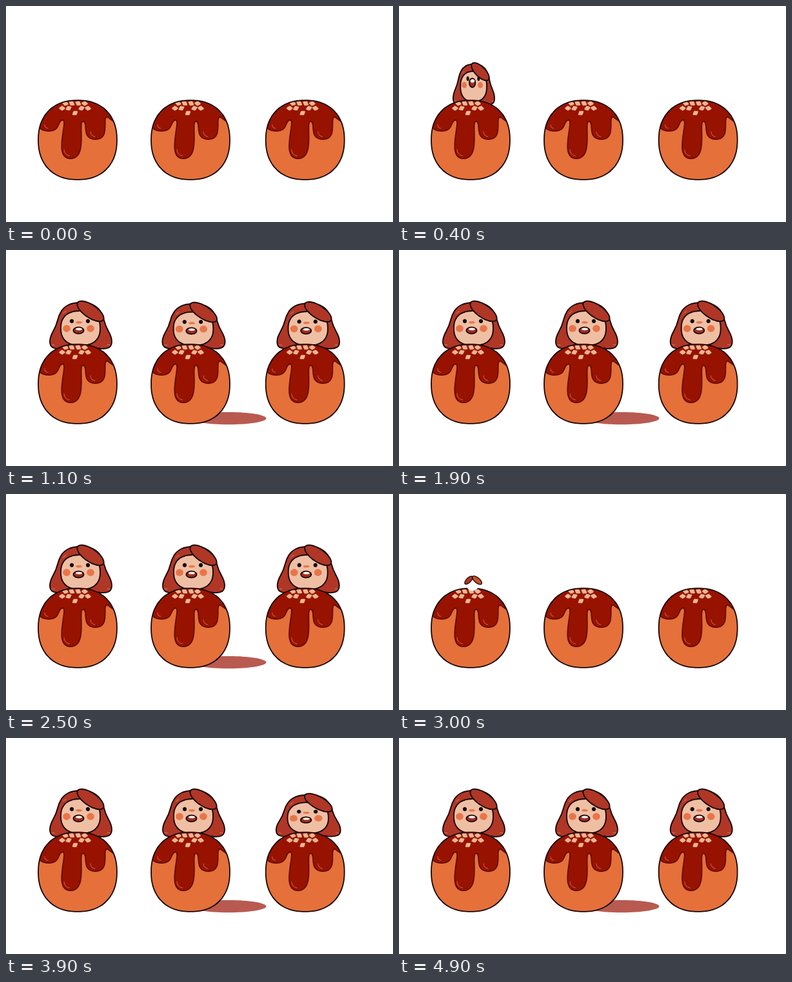
Animation of 600x337 px, one loop 5 s. Source, as an HTML page with a canvas:

```html
<!DOCTYPE html>
<html lang="en">
<head>
<meta charset="utf-8">
<title>Dumplings</title>
<style>
html, body { margin: 0; width: 100%; height: 100%; overflow: hidden; background: #fff; }
canvas { display: block; width: 600px; height: 337px; }
</style>
</head>
<body>
<canvas id="stage" width="600" height="337"></canvas>
<script>
const ctx = document.getElementById('stage').getContext('2d');
const LOOP = 5000, ROUND = 2700, STEP = 100;
const FIRST = 200, STAGGER = 225;
const INK = '#160604', HAIR = '#b03626', SKIN = '#efbfa4', BLUSH = '#e8754a';
const SAUCE = '#981200', SHINE = '#c9583c';
const SHIFTS = [0, 175, 352.7];
const AXIS = 116, NECK = 150;

// Right half of the hair, as offsets from the axis, top to tip.
const hairSide = [[12, 82], [26, 89], [34, 101], [38, 118], [48, 136], [48, 150], [38, 155], [18, 152]];
const hair = [...hairSide, ...hairSide.map(([x, y]) => [-x, y]).reverse()].map(([x, y]) => [AXIS + x, y]);

const drips = [
  { x: 66, w: 10, bottom: 195 },
  { x: 100, w: 14, bottom: 238 },
  { x: 139, w: 12, bottom: 208 }
];
const arches = [[44, 180], [88, 178], [119.5, 180], [157, 173]];

const clamp = v => Math.min(1, Math.max(0, v));

// Points of a superellipse; a higher power is squarer.
function ring(cx, cy, rx, ry, power = 2, tilt = 0) {
  const bend = v => Math.sign(v) * Math.abs(v) ** (2 / power);
  return Array.from({ length: 72 }, (_, i) => {
    const a = i * Math.PI / 36;
    const x = rx * bend(Math.cos(a)), y = ry * bend(Math.sin(a));
    return [cx + x * Math.cos(tilt) - y * Math.sin(tilt), cy + x * Math.sin(tilt) + y * Math.cos(tilt)];
  });
}

function paint(fill, stroke, width) {
  if (fill) { ctx.fillStyle = fill; ctx.fill(); }
  if (stroke) { ctx.strokeStyle = stroke; ctx.lineWidth = width; ctx.stroke(); }
}

// Closed smooth curve, bending around each point.
function blob(pts, fill, stroke, width) {
  const mid = (p, q) => [(p[0] + q[0]) / 2, (p[1] + q[1]) / 2];
  ctx.beginPath();
  ctx.moveTo(...mid(pts[pts.length - 1], pts[0]));
  pts.forEach((p, i) => ctx.quadraticCurveTo(...p, ...mid(p, pts[(i + 1) % pts.length])));
  ctx.closePath();
  paint(fill, stroke, width);
}

function arc(x, y, r, from, to, color, width) {
  ctx.beginPath();
  ctx.arc(x, y, r, from, to);
  paint(null, color, width);
}

// The head shoots up thin, then springs back for three quarters of a swing.
function poseAt(u) {
  const grow = clamp((u - 100) / 150);
  const swing = clamp((u - 300) / 420) * 1.5 * Math.PI;
  const stretch = 0.31 * Math.exp(-swing / 2.6) * Math.cos(swing);
  return {
    sx: 1 - stretch * (stretch > 0 ? 1.07 : 0.4),
    sy: (1 + stretch) * grow,
    open: clamp(stretch / 0.31)
  };
}

function drawHead({ sx, sy, open }) {
  const place = ([x, y]) => [AXIS + (x - AXIS) * sx, NECK + (y - NECK) * sy];
  const part = (pts, ...style) => blob(pts.map(place), ...style);
  const spot = (x, y, rx, ry, ...style) => part(ring(x, y, rx, ry), ...style);
  const lift = 3 * open;

  part(hair, HAIR, INK, 1.9);
  part(ring(115.5, 122, 30.5, 27, 2.4), SKIN, INK, 1.9);
  for (const side of [-1, 1]) {
    spot(112.5 + side * 18.5, 122.5 - lift, 5.8, 5.5, BLUSH);
    spot(114.5 + side * 12.5, 111 - lift, 3.1, 3.2 + open, INK);
    spot(AXIS + side * 43, 148, 3, 1, SHINE);
  }
  spot(113, 113 - lift, 5, 1.8, BLUSH);

  const mouthY = 125.5 - 10 * open, gape = 5 + 3 * open;
  spot(112.5, mouthY, 8 - open, gape, '#a32d1d', INK, 1.8);
  spot(113, mouthY - gape * 0.42, 5, gape * 0.38, '#fff8ee');

  part(ring(131, 95.5, 24, 10, 2, 0.6), HAIR, INK, 1.9);
  part(ring(91, 97, 4, 1, 2, -0.7), SHINE);
}

// First two locks of hair, with a gap beneath them.
function drawLocks() {
  blob(ring(114, 143, 9, 8), '#fff');
  blob(ring(108, 134.5, 8, 3.5, 2, -0.8), HAIR, INK, 1.3);
  blob(ring(121, 134.5, 9, 4, 2, 0.7), '#c5522b', INK, 1.3);
}

function drawSauce() {
  ctx.beginPath();
  ctx.moveTo(44, 130);
  ctx.lineTo(...arches[0]);
  drips.forEach(({ x, w, bottom }, i) => {
    const [ax, ay] = arches[i], [bx, by] = arches[i + 1];
    ctx.bezierCurveTo(ax + 9, ay, x - 2 * w, bottom, x, bottom);
    ctx.bezierCurveTo(x + 2 * w, bottom, bx - 9, by, bx, by);
  });
  ctx.lineTo(180, 190);
  ctx.lineTo(180, 130);
  paint(SAUCE, '#650d05', 1.8);
  for (const { x, w, bottom } of drips) {
    arc(x, bottom - w, w - 4, 0.55 * Math.PI, Math.PI, SHINE, 1.1);
  }
}

function drawFlakes() {
  for (let i = 0; i < 9; i++) {
    const y = i === 4 ? 167 : i % 2 ? 152 : 159.5;
    blob(ring(87 + 5 * i, y, 5, 3.8, 1.2, Math.sin(i * 9) * 0.6), '#ecb592');
  }
}

function drawBall() {
  const ball = ring(111, 209, 61, 62, 2.25);
  blob(ball, '#e5703a');
  ctx.save();
  ctx.clip();
  drawSauce();
  drawFlakes();
  ctx.restore();
  blob(ball, null, INK, 1.8);
}

function render(time) {
  const t = Math.floor((time % LOOP) / STEP) * STEP % ROUND;
  ctx.fillStyle = '#fff';
  ctx.fillRect(0, 0, 600, 337);
  if (t >= FIRST + STAGGER) blob(ring(345, 262.6, 58.5, 9.7), '#b95a50');

  SHIFTS.forEach((shift, i) => {
    const u = t - FIRST - i * STAGGER;
    ctx.save();
    ctx.translate(shift, 0);
    if (u > 0 && u < 90) blob(ring(114.5, 147, 8, 7.5), HAIR, INK, 1.3);
    if (u >= 150) drawHead(poseAt(u));
    drawBall();
    if (u >= 90 && u < 150) drawLocks();
    ctx.restore();
  });
}

ctx.lineJoin = ctx.lineCap = 'round';
const begin = performance.now();
function tick() {
  render(performance.now() - begin);
  requestAnimationFrame(tick);
}
tick();
</script>
</body>
</html>
```
